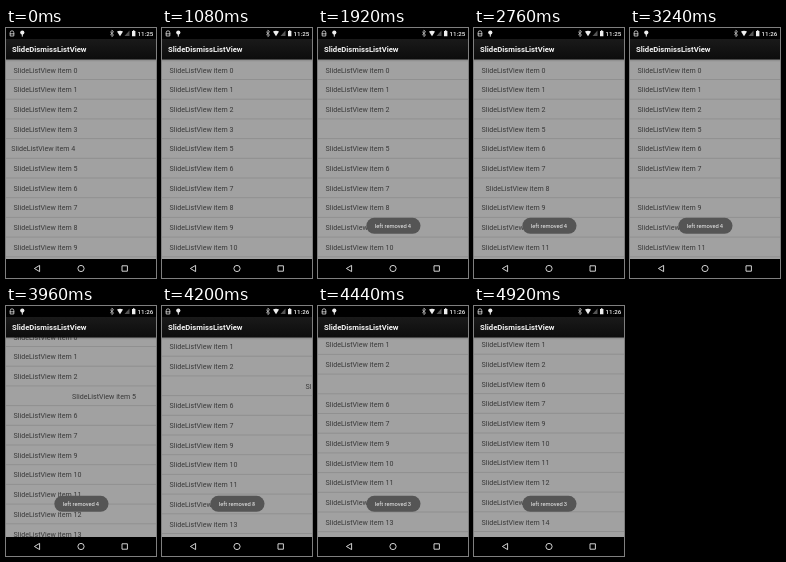
Animation of 150x250 px, one loop 5.16 s. Source, as an HTML page:

```html
<!DOCTYPE html>
<html lang="en">
<head>
<meta charset="utf-8">
<title>Slide to dismiss</title>
<style>
html, body { margin: 0; width: 100%; height: 100%; overflow: hidden; background: #000; }
svg { display: block; width: 100vw; height: 100vh; font-family: Roboto, Arial, sans-serif; }
</style>
</head>
<body>
<svg viewBox="0 0 150 250">
  <defs>
    <linearGradient id="bar" x2="0" y2="1">
      <stop stop-color="#1a1a1a"/><stop offset="1" stop-color="#0c0c0c"/>
    </linearGradient>
    <linearGradient id="shade" x2="0" y2="1">
      <stop stop-color="#000" stop-opacity=".2"/><stop offset="1" stop-opacity="0"/>
    </linearGradient>
    <clipPath id="view"><rect y="31" width="150" height="200"/></clipPath>
  </defs>

  <g clip-path="url(#view)">
    <rect y="31" width="150" height="200" fill="#a1a1a1"/>
    <g id="lines" stroke="#8c8c8c" stroke-width=".8"></g>
    <g id="items" font-size="7.1" fill="#383838"></g>
    <rect y="31" width="150" height="3" fill="url(#shade)"/>
  </g>

  <g id="toast" font-size="5.75" fill="#f4f4f4">
    <rect x="48.3" y="189.8" width="54.2" height="16" rx="8" fill="#555"/>
    <text x="56.8" y="200.2">left removed</text>
    <text id="four" x="89.8" y="200.2">4</text>
    <text id="three" x="89.8" y="200.2">3</text>
  </g>

  <rect width="150" height="11" fill="#000"/>
  <rect y="11" width="150" height="20.5" fill="url(#bar)"/>
  <text x="6" y="23.9" font-size="7.7" font-weight="700" fill="#f4f4f4">SlideDismissListView</text>

  <g fill="#eee">
    <path d="M4.2 8V4.6a1.8 1.8 0 0 1 3.6 0V8zM3.7 5.8h4.6" fill="none" stroke="#ddd" stroke-width=".8"/>
    <circle cx="16.3" cy="4.6" r="2.1"/>
    <rect x="15.8" y="6" width="1" height="2.6"/>
    <path d="M104.2 3.8l3.4 3.2-1.7 1.6v-6.4l1.7 1.6-3.4 3.2" fill="none" stroke="#ddd" stroke-width=".7"/>
    <path d="M111 3.6q3-1.8 6 0l-3 4.6z"/>
    <path d="M118.5 8h5v-5.5z" fill="#555"/>
    <path d="M126 3h1v-.8h1.4v.8h1v5.2h-3.4z"/>
    <text id="clock" x="131.6" y="7.9" font-size="6.2" font-weight="500"></text>
  </g>

  <rect y="231" width="150" height="19" fill="#000"/>
  <g fill="none" stroke="#e8e8e8" stroke-width=".9" stroke-linejoin="round">
    <path d="M33.6 237.4v6.2l-5.2-3.1z"/>
    <circle cx="75" cy="240.5" r="3.1"/>
    <rect x="116" y="237.8" width="5.4" height="5.4"/>
  </g>
</svg>
<script>
const LOOP = 5160, STEP = 120, PITCH = 19.7, COUNT = 16;
const $ = id => document.getElementById(id);
const add = (parent, tag) =>
  $(parent).appendChild(document.createElementNS("http://www.w3.org/2000/svg", tag));

// Value of a track at step k; holds its first and last value outside.
const at = (k, [start, ...vals]) =>
  vals[Math.max(0, Math.min(vals.length - 1, k - start))];

// Tracks: first step, then one value per step.
const slides = {
  4: [0, -2.3, -36, -200],
  3: [9, 0, -2, -6, -16, -38, -200],
  8: [22, 0, 4, 18, 48, 100, 200],
  5: [31, 0, 18, 58.5, 100, 136, 200]
};
const collapse = { 4: 9, 3: 19, 8: 31, 5: 41 };
const scrolling = [31, 0, 4, 11, 17, 21, 22.3, 22.8, 23];
const fade = [9, 0, .3, .55, .75, .85, .93, .93, 1];

const items = [], lines = [];
for (let i = 0; i < COUNT; i++) {
  const text = add("items", "text");
  text.textContent = "SlideListView item " + i;
  items.push(text);
  const line = add("lines", "path");
  line.setAttribute("d", "M0 0H150");
  lines.push(line);
}

const move = (el, x, y) => el.setAttribute("transform", `translate(${x} ${y})`);

function draw(k) {
  const scroll = at(k, scrolling);
  let row = 0;
  items.forEach((text, i) => {
    const gone = k >= collapse[i];
    text.style.display = gone ? "none" : "";
    if (!gone) move(text, 7.6 + (slides[i] ? at(k, slides[i]) : 0), 44.5 + PITCH * row++ - scroll);
  });
  lines.forEach((line, i) => move(line, 0, 51.5 + PITCH * i - scroll));
  $("toast").style.opacity = at(k, fade);
  $("four").style.opacity = at(k, [34, 1, .65, 0]);
  $("three").style.opacity = at(k, [34, 0, .65, 1]);
  $("clock").textContent = k < 24 ? "11:25" : "11:26";
}

const begin = performance.now();
function tick() {
  draw(Math.floor((performance.now() - begin) % LOOP / STEP));
  requestAnimationFrame(tick);
}
tick();
</script>
</body>
</html>
```
